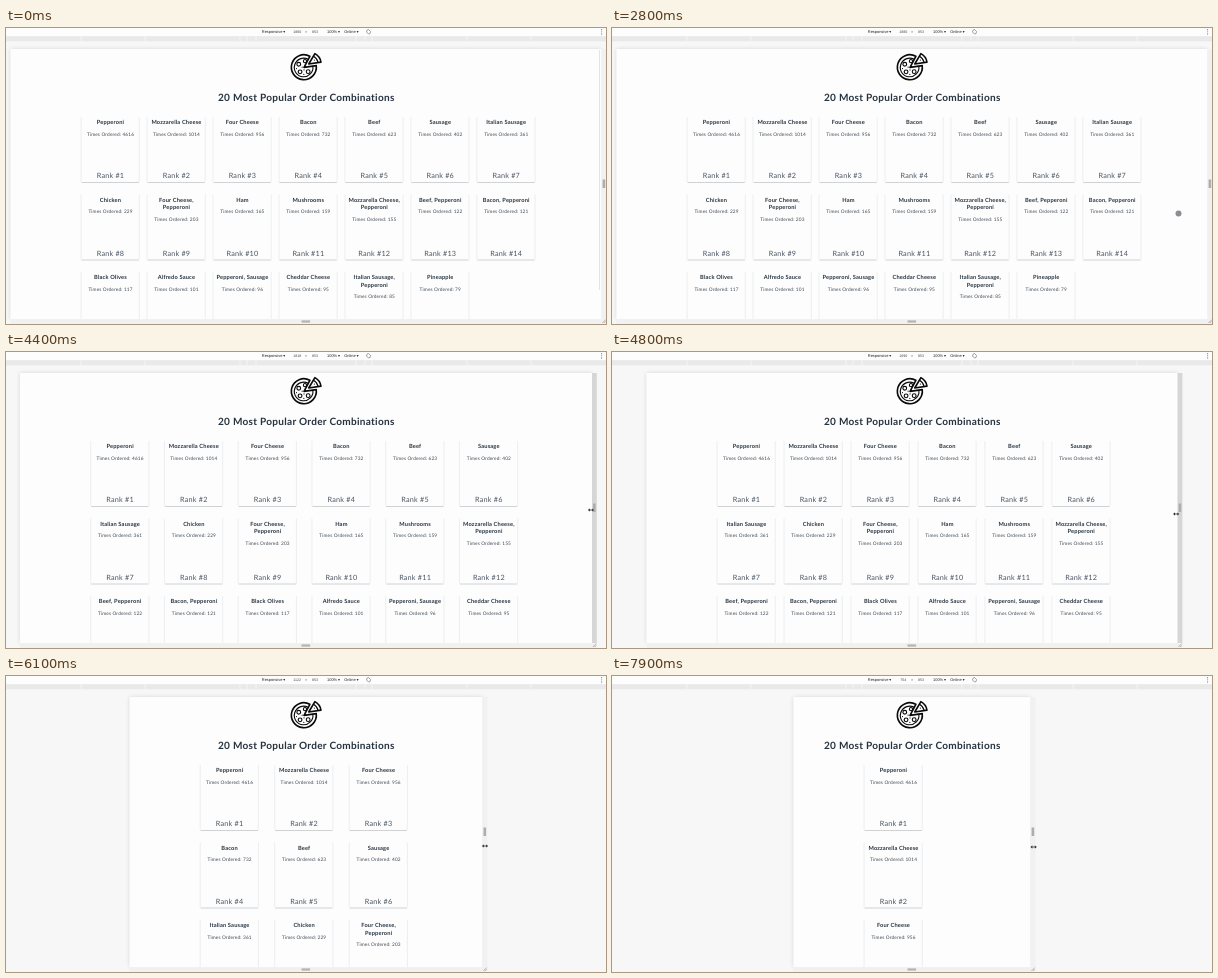
Write an HTML page that moves like this. It is 600 by 296 pixels and loops after 8 s.

```html
<!DOCTYPE html>
<html lang="en">
<head>
<meta charset="utf-8">
<title>Responsive card grid</title>
<style>
html, body { margin: 0; width: 100%; height: 100%; overflow: hidden; background: #f7f7f7; }
svg { display: block; width: 600px; height: 296px; }
text { font-family: Lato, "Open Sans", sans-serif; fill: #27333f; text-anchor: middle;
  text-rendering: geometricPrecision; letter-spacing: .028em; }
.heading { font-size: 10.05px; font-weight: 700; }
.name { font-size: 5.7px; font-weight: 700; }
.count { font-size: 4.77px; fill: #3c4753; }
.rank { font-size: 7.25px; fill: #4a5562; }
.bar text { font-family: "Liberation Sans", Arial, sans-serif; font-size: 3.95px; fill: #222;
  text-anchor: start; letter-spacing: 0; }
.bar .size { font-size: 3.6px; fill: #444; text-anchor: middle; }
.icon { fill: none; stroke: #0a0a0a; stroke-width: 1.75; stroke-linejoin: round; stroke-linecap: round; }
</style>
</head>
<body>
<svg id="stage" viewBox="0 0 600 296">
  <defs>
    <clipPath id="clip"><rect id="clipBox" y="21" height="270"/></clipPath>
    <filter id="soft" x="-10%" y="-10%" width="120%" height="120%"><feGaussianBlur stdDeviation="2"/></filter>
  </defs>
  <rect width="600" height="296" fill="#f7f7f7"/>

  <g class="bar">
    <rect width="600" height="8" fill="#fdfdfd"/>
    <rect y="8.3" width="600" height="5" fill="#e9e9e9"/>
    <g id="ticks" fill="#f5f5f5"></g>
    <text x="255.8" y="5.3">Responsive</text>
    <text class="size" id="width" x="291.2" y="5.2"></text>
    <text class="size" x="300" y="5.2">×</text>
    <text class="size" x="309" y="5.2">853</text>
    <text x="321" y="5.3">100%</text>
    <text x="338.2" y="5.3">Online</text>
    <path d="M277.2 2.9h2l-1 2zM332 2.9h2l-1 2zM350.6 2.9h2l-1 2z" fill="#333"/>
    <path d="M361 2.2l1.5-.7 2 2-.4 2-1.6.5-2-2z" fill="none" stroke="#666" stroke-width=".6"/>
    <path d="M595.2 1.3h.9v.9h-.9zM595.2 3.4h.9v.9h-.9zM595.2 5.5h.9v.9h-.9z" fill="#555"/>
  </g>

  <rect id="shadow" y="21" height="270" fill="#000" opacity=".13" filter="url(#soft)"/>
  <rect id="bottom" y="291" height="5" fill="#f1f1f1"/>
  <rect id="page" y="21" height="270" fill="#fdfdfd"/>
  <rect x="295.5" y="292.4" width="8.6" height="2.2" fill="#b4b4b4"/>

  <g id="side">
    <rect id="strip" y="21" width="4.8" height="270"/>
    <rect x="1" y="151.5" width="2.6" height="8.5" fill="#adadad"/>
    <rect y="291" width="4.8" height="5" fill="#f1f1f1"/>
    <path d="M.8 295l3.4-3.4M2.6 295l1.6-1.6" stroke="#999" stroke-width=".7"/>
  </g>

  <g clip-path="url(#clip)">
    <g class="icon" transform="translate(300 38.6) scale(.94) translate(-299.7 -39)">
      <path d="M297.6 39.8L303.8 28A13.3 13.3 0 1 0 310.6 38z"/>
      <path d="M302 31.3A9.9 9.9 0 1 0 307 38.7" stroke-width="1.2"/>
      <path d="M302.6 36.2L309.2 25.2Q314.6 28 315.6 34.2z"/>
      <path d="M307.7 27.9Q311.7 30.2 312.5 34.5" stroke-width="1.2"/>
      <g stroke-width="1.2">
        <circle cx="292" cy="36.5" r="2"/><circle cx="298.6" cy="33.2" r="1.7"/>
        <circle cx="293.4" cy="44.6" r="2"/><circle cx="302" cy="44.4" r="2"/>
        <path d="M297.4 47.3v.1M297.6 42.5v.1M289.6 41v.1M295.6 39.6v.1M308.6 32v.1"/>
      </g>
    </g>
    <text class="heading" x="300.3" y="73.4">20 Most Popular Order Combinations</text>
    <g id="cards"></g>
  </g>

  <rect id="thumb" x="593" y="22" width=".8" height="240" fill="#dedede"/>
  <circle id="touch" r="3" fill="#8b8f94"/>
  <path id="arrows" d="M-3.2 0l2-1.8v1.2h2.4v-1.2l2 1.8-2 1.8V.6h-2.4v1.2z" fill="#111" stroke="#fff" stroke-width=".3"/>
</svg>

<script>
const LOOP = 8000, STEP = 100;
const SCALE = 0.3145, MID = 300;
const SIDE_PAD = 141, GAP = 11.5, MIN_TRACK = 53;
const CARD_W = 58.6, CARD_H = 67, TOP = 88, ROW = 77.5;

const orders = [
  ["Pepperoni", 4616], ["Mozzarella Cheese", 1014], ["Four Cheese", 956], ["Bacon", 732],
  ["Beef", 623], ["Sausage", 402], ["Italian Sausage", 361], ["Chicken", 229],
  ["Four Cheese,|Pepperoni", 203], ["Ham", 165], ["Mushrooms", 159],
  ["Mozzarella Cheese,|Pepperoni", 155], ["Beef, Pepperoni", 122], ["Bacon, Pepperoni", 121],
  ["Black Olives", 117], ["Alfredo Sauce", 101], ["Pepperoni, Sausage", 96],
  ["Cheddar Cheese", 95], ["Italian Sausage,|Pepperoni", 85], ["Pineapple", 79]
];

// [time, right edge of the page]
const edgeKeys = [
  [4000, 595.6], [4400, 586], [4900, 560.5], [5300, 528.4], [5800, 498.8],
  [6100, 476.5], [6700, 476.5], [7300, 447.3], [7600, 432], [7900, 418.6]
];
// [time, x, y]
const touchKeys = [[300, 606, 198], [400, 599, 194.8], [800, 566.5, 185.5], [3100, 566.5, 185.5], [3600, 597, 160]];
const arrowKeys = [
  [4000, 598, 158], [4400, 585, 158], [4900, 559, 163], [5300, 527, 167], [5800, 497, 169],
  [6100, 479, 170], [6700, 479, 170], [7300, 445.6, 169.6], [7600, 431, 170.5], [7900, 421.6, 171]
];

const $ = id => document.getElementById(id);

function add(parent, tag, attrs, label) {
  const el = document.createElementNS("http://www.w3.org/2000/svg", tag);
  set(el, attrs);
  if (label !== undefined) el.textContent = label;
  parent.appendChild(el);
  return el;
}

function set(el, attrs) {
  for (const key in attrs) el.setAttribute(key, attrs[key]);
}

function at(keys, t) {
  if (t <= keys[0][0]) return keys[0].slice(1);
  for (let i = 1; i < keys.length; i++) {
    const a = keys[i - 1], b = keys[i];
    if (t <= b[0]) {
      const k = (t - a[0]) / (b[0] - a[0]);
      return a.slice(1).map((v, j) => v + (b[j + 1] - v) * k);
    }
  }
  return keys[keys.length - 1].slice(1);
}

function makeCard([name, count], i) {
  const g = add($("cards"), "g", {});
  const mid = CARD_W / 2 + .3;
  const lines = name.split("|");
  add(g, "path", { d: `M.2 1V${CARD_H - 1}M${CARD_W - .2} 1V${CARD_H - 1}`, stroke: "#e6e8ea", "stroke-width": .7 });
  add(g, "path", { d: `M.6 ${CARD_H - .5}H${CARD_W - .6}`, stroke: "#cbcdcf", "stroke-width": .9 });
  lines.forEach((line, n) => add(g, "text", { class: "name", x: mid, y: 8 + n * 7.8 }, line));
  add(g, "text", { class: "count", x: mid, y: 12 + lines.length * 7.7 }, "Times Ordered: " + count);
  add(g, "text", { class: "rank", x: mid, y: 62.2 }, "Rank #" + (i + 1));
  return g;
}

const cards = orders.map(makeCard);
for (const d of [50, 59, 66, 161, 225])
  for (const x of [MID - d, MID + d]) add($("ticks"), "rect", { x: x - .5, y: 8.3, width: 1, height: 5 });

function layout(right) {
  const width = 2 * (right - MID), left = MID - width / 2;
  for (const id of ["page", "shadow", "clipBox", "bottom"]) set($(id), { x: left, width });
  set($("side"), { transform: `translate(${right} 0)` });
  $("width").textContent = Math.round(width / SCALE / 2) * 2;

  const inner = width - SIDE_PAD;
  const cols = Math.max(1, Math.floor((inner + GAP) / (MIN_TRACK + GAP)));
  const pitch = (inner + GAP) / cols;
  cards.forEach((card, i) => {
    const x = MID - inner / 2 + (i % cols) * pitch;
    const y = TOP + Math.floor(i / cols) * ROW;
    set(card, { transform: `translate(${x} ${y})` });
  });
}

function place(el, keys, t, shown) {
  const [x, y] = at(keys, t);
  set(el, { transform: `translate(${x} ${y})`, visibility: shown ? "visible" : "hidden" });
}

function draw(now) {
  const t = Math.floor((now % LOOP) / STEP) * STEP;
  const hover = t >= 3600 && t < 5000;
  layout(at(edgeKeys, t)[0]);
  place($("touch"), touchKeys, t, t >= 400 && t < 3600);
  place($("arrows"), arrowKeys, t, t >= 3600);
  set($("strip"), { fill: hover ? "#d6d6d6" : "#f1f1f1" });
  set($("thumb"), { opacity: t < 2200 ? 1 : t < 2300 ? .5 : 0 });
}

const start = performance.now();
function tick() {
  draw(performance.now() - start);
  requestAnimationFrame(tick);
}
tick();
</script>
</body>
</html>
```
